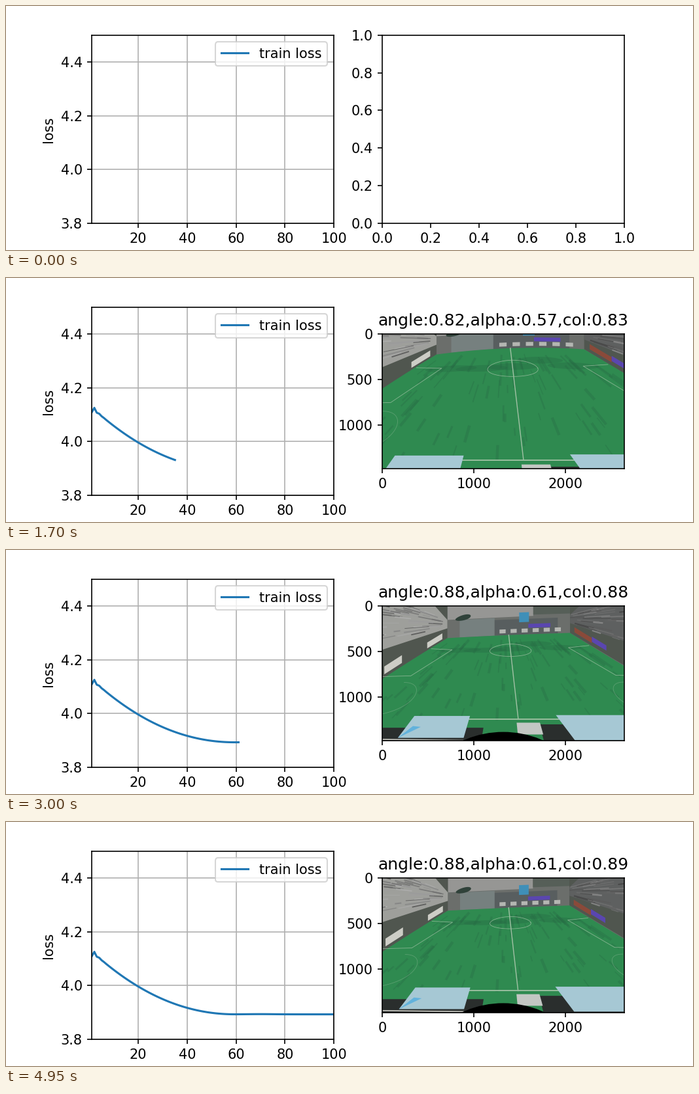
A matplotlib script that plays this animation: 1050x375 px, repeating every 5000 ms.

```python
import numpy as np
import matplotlib.pyplot as plt
from matplotlib.animation import FuncAnimation
from matplotlib.lines import Line2D
from matplotlib.patches import Circle, Polygon
from matplotlib.transforms import Affine2D

W, H, DPI = 1050, 375, 150
FRAMES, INTERVAL = 100, 50
IMAGE_W, IMAGE_H = 2640, 1477

fig, (plot, blank) = plt.subplots(1, 2, figsize=(W / DPI, H / DPI), dpi=DPI)

# Loss: a power-law fall to a plateau, with a short wobble at the start
epochs = np.arange(1, FRAMES + 1)
loss = (3.8925 + 0.1325 * (np.clip(60 - epochs, 0, None) / 45) ** 2.1
        - 0.017 * (-0.42) ** (epochs - 1)
        + 0.0008 * np.exp(-((epochs - 70) / 8) ** 2))

curve, = plot.plot([], [], label="train loss")
plot.set(xlim=(1, 100), ylim=(3.8, 4.5), ylabel="loss",
         xticks=range(20, 101, 20), yticks=np.arange(3.8, 4.5, 0.2))
plot.grid()
plot.legend(loc="upper right")

# Camera view in the same slot as the blank axes
view = fig.add_axes(blank.get_position())
view.set(xlim=(-0.5, IMAGE_W - 0.5), ylim=(IMAGE_H - 0.5, -0.5), aspect="equal",
         xticks=range(0, 2001, 1000), yticks=range(0, 1001, 500))
view.set_facecolor("#6b6e6b")
title = view.set_title("")
stage = Affine2D().scale(1 / W, -1 / H).translate(0, 1) + fig.transFigure
movers = []


def project(points, tilt):
    """Stage pixels of (across, depth, height) points.

    across: -1 left to 1 right; depth: 0 far touchline, 1 near touchline;
    height: pixels above the ground. The far side lags behind the near side.
    """
    across, depth, height = np.array(points, float).T
    lag = tilt - 0.6 * (tilt - tilt ** 2)
    far, near = 97 + 37 * lag, 297 - 39 * tilt
    centre = 772 - 4 * lag + depth * (25 - 11 * tilt)
    half_width = 122 - 31 * lag + depth * (285 - 85 * lag)
    bow = (8 * (1 - lag) * across ** 2 - 4 * across) * np.clip(1 - depth, 0, 1) ** 3
    return np.column_stack([centre + across * half_width,
                            far + (near - far) * depth + bow - height])


def shape(points, color, alpha=1):
    patch = Polygon([(0, 0)], closed=True, facecolor=color, edgecolor="none",
                    alpha=alpha, transform=stage, zorder=1)
    view.add_artist(patch)
    movers.append(lambda tilt: patch.set_xy(project(points, tilt)))


def stroke(points, color, width=0.5, alpha=1):
    line = Line2D([], [], color=color, lw=width, alpha=alpha, transform=stage, zorder=1)
    view.add_artist(line)
    movers.append(lambda tilt: line.set_data(*project(points, tilt).T))


def backdrop(left, right, low, high, color):
    """Upright panel behind the far touchline."""
    shape([(left, 0, low), (left, 0, high), (right, 0, high), (right, 0, low)], color)


def board(side, start, end, low, high, color):
    """Upright panel along a goal line."""
    shape([(side, start, low), (side, start, high),
           (side, end, high), (side, end, low)], color)


def ground(left, right, far, near, color, skew=0):
    shape([(left, far, 0), (right, far, 0),
           (right + skew, near, 0), (left + skew, near, 0)], color)


def arc(across, depth, width, length, start, stop):
    t = np.linspace(start, stop, 60)
    return np.column_stack([across + width * np.cos(t), depth + length * np.sin(t), 0 * t])


GREEN, SHADE, CHALK = "#2f8a50", "#266843", "#9dc0a2"
DARK, PALE, CANVAS = "#2a2e2d", "#cdcdc6", "#a6c8d4"
RED, PURPLE, BLUE = "#8a4a3a", "#5a46b0", "#3f8fb8"
rng = np.random.default_rng(4)

# Far side: skyline, hill, shed, signs, parked cars
backdrop(-1.0, 0.4, 28, 80, "#969694")
backdrop(0.4, 1.2, 30, 80, "#565f58")
backdrop(-0.8, -0.23, 0, 27, "#76807f")
backdrop(-0.23, 0.8, 0, 24, "#585e5f")
backdrop(0.17, 0.33, 19, 34, BLUE)
backdrop(0.32, 0.68, 10, 16, PURPLE)
for across in np.linspace(-0.15, 0.75, 6):
    backdrop(across, across + 0.1, 3, 9, "#b4b6b2")

# Stands on both sides, streaked along their length
for side, wall, tones in ((-1, "#9e9f9b", (0.3, 0.72)), (1, "#5e6060", (0.25, 0.6))):
    board(side, 0, 0.8, 0, 60, "#50564f")
    shape([(side, 0, 15), (side, 0.8, 63), (side, 0.8, 300), (side, 0, 28)], wall)
    for _ in range(60):
        depth, length, level = rng.uniform(0, 0.6), rng.uniform(0.04, 0.2), rng.random()
        ends = [(side, d, 15 + 60 * d + level * (13 + 140 * d)) for d in (depth, depth + length)]
        stroke(ends, str(rng.uniform(*tones)), rng.uniform(0.3, 1.1), 0.8)
shape(arc(-0.74, 0, 0.11, 0.04, 0, 2 * np.pi) + [0, 0, 30], "#30423a")

# Pitch with streaks running away from the camera
far_edge = [(across, 0, 0) for across in np.linspace(-1, 1, 21)]
shape(far_edge + [(1, d, 0) for d in np.linspace(0, 1.6, 17)]
      + [(-1, d, 0) for d in np.linspace(1.6, 0, 17)], GREEN)
for _ in range(90):
    across, depth = rng.uniform(-0.9, 0.9), 0.05 + 0.9 * rng.random() ** 1.5
    length = rng.uniform(0.05, 0.15)
    stroke([(across, depth, 0), (across, depth + length, 0)],
           SHADE, rng.uniform(0.6, 2.2), 0.3)
for across in np.linspace(-0.6, 0.6, 5):
    shape(arc(across, 0.1 + 0.08 * rng.random(), 0.25, 0.03, 0, 2 * np.pi), SHADE, 0.35)

stroke([(0, 0, 0), (0, 1, 0)], CHALK, 0.7)
stroke([(-0.3, 1, 0), (0.25, 1, 0)], CHALK, 0.9)
stroke(arc(0, 0.18, 0.24, 0.073, 0, 2 * np.pi), CHALK, 0.4, 0.8)
for side in (-1, 1):
    stroke([(side * 0.98, 0.14, 0), (side * 0.7, 0.16, 0),
            (side * 0.81, 0.48, 0), (side * 1.1, 0.49, 0)], CHALK, 0.4, 0.8)
    stroke(arc(side * 0.8, 0.76, -side * 0.17, 0.2, -np.pi / 2, np.pi / 2), CHALK, 0.4, 0.4)

# Boards along the goal lines
board(-1, 0.04, 0.16, 3, 12, PALE)
board(-1, 0.36, 0.5, 5, 17, PALE)
board(1, 0.03, 0.15, 5, 13, RED)
board(1, 0.15, 0.25, 7, 15, PURPLE)

# Near side: shadows, box, shelters and lens rim
ground(-0.85, -0.17, 1.1, 1.5, DARK)
ground(0.1, 0.6, 1.06, 1.5, DARK)
stroke([(-0.85, 1.23, 0), (-0.25, 1.25, 0)], PALE, 0.8)
ground(-0.01, 0.105, 1.04, 1.18, "#c3c7c3")
ground(-0.54, -0.25, 0.96, 1.22, CANVAS)
shape([(-0.51, 1.08, 0), (-0.47, 1.09, 0), (-0.54, 1.22, 0)], "#62b2dc")
ground(0.2, 0.9, 0.95, 1.25, CANVAS, skew=0.035)
rim = Circle((760, 0), 150, color="black", lw=0, transform=stage, zorder=1)
view.add_artist(rim)
movers.append(lambda tilt: rim.set_center((760, 490 - 64 * tilt)))


def angle_at(frame):
    """Steady climb, a small overshoot, then rest."""
    remaining = max(62 - frame, 0) / 48
    return 0.884 - 0.114 * remaining ** 1.145 + 0.0047 * np.exp(-((frame - 72) / 9) ** 2)


def update(frame):
    curve.set_data(epochs[:frame + 1], loss[:frame + 1])
    blank.set_visible(frame == 0)
    view.set_visible(frame > 0)
    angle = angle_at(frame)
    title.set_text(f"angle:{angle:.2f},alpha:{angle * 0.6915:.2f},col:{angle + 0.003:.2f}")
    for move in movers:
        move((angle - 0.77) / 0.1185)
    return []


anim = FuncAnimation(fig, update, frames=FRAMES, interval=INTERVAL,
                     init_func=lambda: update(0), repeat=True, repeat_delay=0)
plt.show()
```
